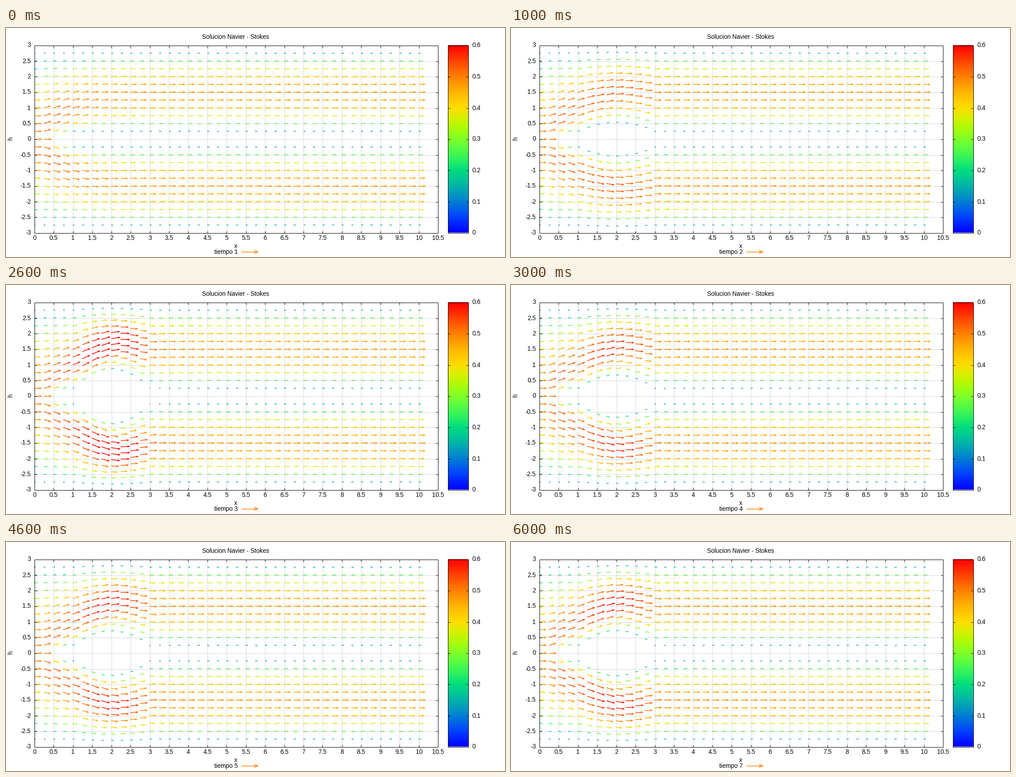
Write a matplotlib script that moves like this. It is 1102x508 px and loops after 7000 ms.

```python
import numpy as np
import matplotlib.pyplot as plt
from matplotlib.animation import FuncAnimation
from matplotlib.collections import LineCollection, PolyCollection
from matplotlib.patches import Rectangle

W, H, DPI = 1102, 508, 100
PX = 72 / DPI                                # one pixel in points
LEFT, RIGHT, TOP, BOTTOM = 62, 953, 38, 454
SX, SY = (RIGHT - LEFT) / 10.5, (BOTTOM - TOP) / 6
BAR_L, BAR_R = 975, 1020
SCALE = 0.4                                  # arrow length per unit of speed
FAR_PEAK = 0.475
BUMP = [0, 0.31, 0.68, 0.46, 0.5, 0.507, 0.509]
ORANGE = (1, 0.5, 0)

plt.rcParams["font.family"] = "Liberation Sans"
fig = plt.figure(figsize=(W / DPI, H / DPI), dpi=DPI, facecolor="white")
ax = fig.add_axes([0, 0, 1, 1])
ax.set_xlim(-0.5, W - 0.5)
ax.set_ylim(H - 0.5, -0.5)
ax.axis("off")


def to_px(x, y):
    return LEFT + x * SX, (TOP + BOTTOM) / 2 - y * SY


def rainbow(speed):
    t = np.clip(np.asarray(speed, float) / 0.6, 0, 1)
    rgb = [3 * t - 1, np.sin(np.pi * t), 1.16 - 2 * t]
    return np.clip(np.stack(rgb, axis=-1), 0, 1)


def text(x, y, s, **kw):
    return ax.text(x, y, s, fontsize=13.5 * PX, color="black", **kw)


def lines(segments, color="black", width=1.0, **kw):
    coll = LineCollection(segments, colors=color, linewidths=width * PX, **kw)
    ax.add_collection(coll)
    return coll


def frame_box(x0, x1):
    ax.add_patch(Rectangle((x0, TOP), x1 - x0, BOTTOM - TOP, fill=False,
                           ec="black", lw=PX, zorder=5))


def draw_axes():
    grid, ticks = [], []
    for v in np.arange(0, 10.6, 0.5):
        x = round(to_px(v, 0)[0])
        grid.append([(x, BOTTOM), (x, TOP)])
        ticks += [[(x, BOTTOM), (x, BOTTOM - 5)], [(x, TOP), (x, TOP + 5)]]
        text(x + 0.5, 470, f"{v:g}", ha="center")
    for v in np.arange(-3, 3.1, 0.5):
        y = round(to_px(0, v)[1])
        grid.append([(LEFT, y), (RIGHT, y)])
        ticks += [[(LEFT, y), (LEFT + 5, y)], [(RIGHT, y), (RIGHT - 5, y)]]
        text(54.5, y + 4, f"{v:g}", ha="right")
    lines(grid, "#8c8c8c", linestyles=[(0, (1, 2))], zorder=1)
    lines(ticks, zorder=5)
    frame_box(LEFT, RIGHT)
    text(507, 23, "Solucion Navier - Stokes", ha="center")
    text(507, 488, "x", ha="center")
    text(10, 245, "h", rotation=90, ha="center", va="center")


def draw_colorbar():
    ramp = rainbow(np.linspace(0.6, 0, 256))[:, None, :]
    ax.imshow(ramp, extent=(BAR_L, BAR_R, BOTTOM, TOP), aspect="auto",
              interpolation="nearest", zorder=2)
    ticks = []
    for i in range(7):
        y = round(BOTTOM - i * (BOTTOM - TOP) / 6)
        ticks += [[(BAR_L, y), (BAR_L + 5, y)], [(BAR_R, y), (BAR_R - 5, y)]]
        text(1029.5, y + 4, f"{i / 10:g}")
    lines(ticks, zorder=5)
    frame_box(BAR_L, BAR_R)
    ax.set_xlim(-0.5, W - 0.5)
    ax.set_ylim(H - 0.5, -0.5)


def channel_flow(x, y):
    """Inlet parabola relaxing into a channel parabola over each half."""
    p = 1.5
    far = FAR_PEAK * (4 / 3 * y - 4 / 9 * y**2)
    excess = 0.5 * (1 - y**2 / 9) - far
    flux = (y / 2 - y**3 / 54 - FAR_PEAK * (2 / 3 * y**2 - 4 / 27 * y**3)
            - (1 - 2 * FAR_PEAK) * y / 3)
    reach = 0.15 + 1.2 * (1 - np.exp(-1.2 * y))
    slope = 1.44 * np.exp(-1.2 * y)
    s = (x / reach)**p
    decay = np.exp(-s)
    u = far + decay * (excess + p * s * slope / reach * flux)
    v = flux * p * np.sqrt(x) / reach**p * decay
    return u, v


def deflection(x, height):
    """Streamline lift over the bump and its slope, with a long wake."""
    t = x - 2.15
    front = height * np.exp(-(t / 0.9)**2)
    q = 1 + (t / 0.75)**2
    wake = height * q**-1.5
    lift = np.where(t < 0, front, wake)
    slope = np.where(t < 0, -2 * t / 0.81 * front,
                     -0.5 * 3 * t / 0.5625 / q * wake)
    return lift, slope


def flow(height):
    x, eta = np.meshgrid(np.arange(41) * 0.25, np.arange(1, 12) * 0.25)
    x, eta = x.ravel(), eta.ravel()
    wall = height * np.clip(1 - (x - 2)**2, 0, None)
    y = wall + (3 - wall) * eta / 3
    lift, slope = deflection(x, height)
    rel = np.clip(3 * (y - lift) / (3 - lift), 0.02, 3)
    u, v = channel_flow(x, rel)
    u = u * 3 / (3 - lift)
    v = v + u * slope * (1 - rel / 3)
    axis_x, zero = np.array([0, 0.25]), np.zeros(2)
    return (np.r_[x, x, axis_x], np.r_[y, -y, zero],
            np.r_[u, u, 0.5, 0.5], np.r_[v, -v, zero])


def arrow_shapes(height):
    x, y, u, v = flow(height)
    tail = np.stack(to_px(x, y), axis=-1)
    step = np.stack([u * SCALE * SX, -v * SCALE * SY], axis=-1)
    tip = tail + step
    length = np.hypot(*step.T)
    unit = step / np.maximum(length, 1e-6)[:, None]
    normal = unit[:, ::-1] * [-1, 1]
    back = tip - 5.5 * unit
    colors = rainbow(np.hypot(u, v))
    big = length > 12.3
    end = np.where(big[:, None], tip - 2 * unit, tip)
    heads = np.stack([tip, back + 2.3 * normal, back - 2.3 * normal], axis=1)
    return np.stack([tail, end], axis=1), colors, heads[big], colors[big]


draw_axes()
draw_colorbar()
lines([[(519, 496), (556, 496)], [(547, 492.5), (556, 496)],
       [(547, 499.5), (556, 496)]], [ORANGE], 1.5, zorder=4)
label = text(511.5, 500, "", ha="right")
shafts = lines([], width=1.6, zorder=3)
heads = PolyCollection([], linewidths=0, zorder=3)
ax.add_collection(heads)


def update(i):
    segments, colors, triangles, head_colors = arrow_shapes(BUMP[i])
    shafts.set_segments(segments)
    shafts.set_color(colors)
    heads.set_verts(triangles)
    heads.set_facecolor(head_colors)
    label.set_text(f"tiempo {i + 1}")
    return shafts, heads, label


anim = FuncAnimation(fig, update, frames=len(BUMP), interval=1000,
                     repeat=True, repeat_delay=0, blit=False)
plt.show()
```
